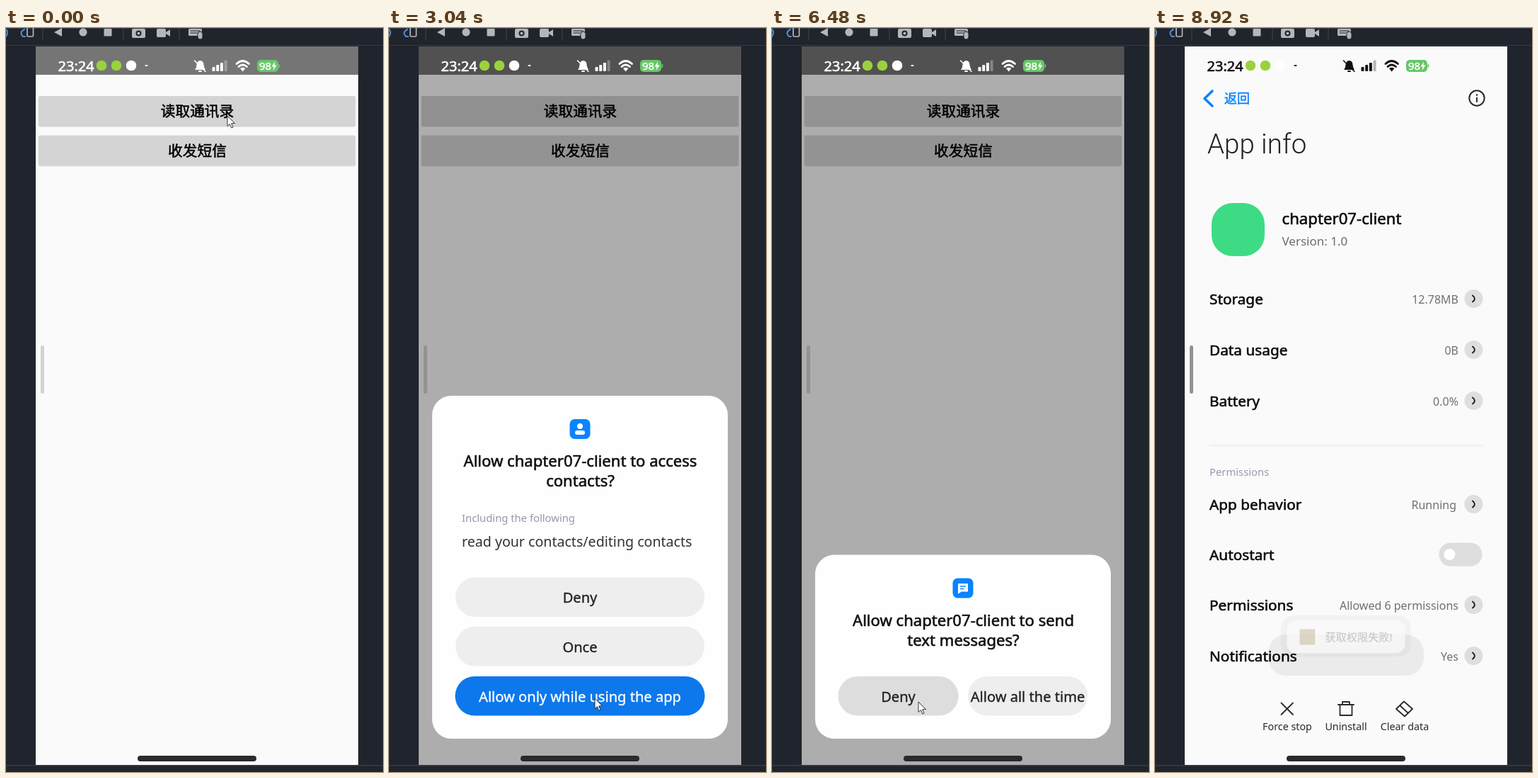
An HTML page that plays this animation: 533x1050 px, repeating every 8.94 s.

```html
<!DOCTYPE html>
<html lang="zh-CN">
<head>
<meta charset="utf-8">
<title>Permission requests</title>
<style>
  html, body { margin: 0; width: 100%; height: 100%; overflow: hidden; background: #20242c; }
  svg { display: block; width: 100%; height: 100%; }
  text { font-family: "Noto Sans", "Noto Sans CJK SC", "Noto Sans CJK", sans-serif; }
  #heading text { font-family: Roboto, Lato, sans-serif; font-weight: 300; }
</style>
</head>
<body>
<svg id="stage" viewBox="0 0 533 1050" preserveAspectRatio="xMinYMin"></svg>
<script>
const LOOP = 8940;
const stage = document.getElementById('stage');

// ---- markup helpers ----
const rect = (x, y, w, h, r, fill, extra = '') =>
  `<rect x="${x}" y="${y}" width="${w}" height="${h}" rx="${r}" fill="${fill}" ${extra}/>`;
const circle = (x, y, r, fill) => `<circle cx="${x}" cy="${y}" r="${r}" fill="${fill}"/>`;
const line = (d, color, width = 2) =>
  `<path d="${d}" fill="none" stroke="${color}" stroke-width="${width}" stroke-linecap="round" stroke-linejoin="round"/>`;
const shape = (d, fill) => `<path d="${d}" fill="${fill}"/>`;
// "thicken" outlines the glyphs to give a medium weight.
const text = (x, y, size, str, { fill = '#111', weight = 400, anchor = 'start', thicken = 0 } = {}) =>
  `<text x="${x}" y="${y}" font-size="${size}" font-weight="${weight}" fill="${fill}" text-anchor="${anchor}"
    stroke="${fill}" stroke-width="${thicken}" stroke-linejoin="round">${str}</text>`;
const middle = (x, y, size, str, options) => text(x, y, size, str, { anchor: 'middle', ...options });
const group = (id, body, extra = '') => `<g id="${id}" ${extra}>${body}</g>`;

// ---- parts ----
function toolbar() {
  const gray = '#b4b6ba', blue = '#4a8fd6';
  return rect(0, 0, 533, 1, 0, '#383b42') + rect(0, 24, 533, 1, 0, '#343b45') + rect(0, 1040, 533, 1.5, 0, '#363d47') +
    [52, 166, 245].map(x => rect(x - .5, 0, 1, 18, 0, '#41454d')).join('') +
    line('M0 2Q4 6 0 12', blue) + line('M26 2Q18 6 24 12H27', blue) +
    `<rect x="30" y="-4" width="8.5" height="16" rx="1.5" fill="none" stroke="${gray}" stroke-width="1.7"/>` +
    shape('M68 6L79 0V12Z', gray) + circle(109, 6, 5.6, gray) + rect(138.5, 1, 11, 10.5, 1, gray) +
    rect(178, 1, 19, 13, 2, gray) + circle(187.5, 7.5, 4, '#20242c') + circle(187.5, 7.5, 2, gray) +
    rect(213, 1, 13, 12, 2, gray) + shape('M226 6L232 2V12L226 8Z', gray) +
    rect(258, 1, 19, 10, 1.5, gray) +
    line('M261 4H274M261 7H270', '#20242c', 1.2) +
    rect(271, 5, 7, 11, 3.5, gray, 'stroke="#20242c"');
}

function statusIcons() {
  const ink = 'currentColor';
  return text(73.5, 61, 20, '23:24', { fill: ink, thicken: .6 }) +
    circle(135, 53, 7.3, '#9bd23c') + circle(156, 53, 7.3, '#9bd23c') + circle(177, 53, 7.3, '#fff') +
    rect(196.5, 52, 4, 2, 1, ink) +
    shape('M267 59Q269.5 56 269.5 52Q270 46.5 274.5 46Q279.5 46.5 279.5 52Q280 56 282 59Z', ink) +
    rect(272, 60, 5, 2, 1, ink) +
    line('M266.5 46L282 61.5', ink, 1.6) +
    [6, 9, 12].map((h, i) => rect(291.5 + i * 5.7, 61 - h, 4, h, 1, ink)).join('') +
    rect(308.6, 45.5, 4, 15.5, 1, ink, 'opacity=".3"') +
    line('M326 50.5Q334.5 42.5 343.5 50.5M329 54.5Q334.5 49.5 340.5 54.5', ink, 2.8) +
    shape('M331 57Q334.7 54.5 338.4 57L334.7 61.5Z', ink) +
    rect(355, 45, 30, 17, 5, '#67c768') + rect(385.5, 51, 1.8, 5, .9, '#67c768') +
    text(358, 59, 15, '98', { fill: '#fff', thicken: .5 }) +
    shape('M380 47.5L375.5 54.5H378.5L377.5 60L382.5 52.5H379.5Z', '#fff');
}

function menu() {
  const button = (id, y, label) =>
    rect(45.5, y + .5, 449, 43.5, 3, '#e6e6e6') + rect(46, y, 448, 43, 2, '#d4d4d4', `id="${id}"`) +
    middle(270.5, y + 29, 20.7, label, { thicken: .5, fill: '#000' });
  return rect(42, 26, 456, 1014, 0, '#fafafa') + rect(42, 26, 456, 40, 0, '#757575') +
    button('contactsButton', 96, '读取通讯录') + button('smsButton', 151.5, '收发短信');
}

function dialog(top, icon, titles, body) {
  return rect(61, top, 418, 1003 - top, 27, '#fefefe') + rect(255.5, top + 33, 29, 28, 7, '#0a84ff') +
    `<g transform="translate(270 ${top + 47})">${icon}</g>` +
    titles.map((str, i) => middle(270.5, top + 100 + i * 28, 22.1, str, { thicken: .6 })).join('') + body;
}

const pill = (x, y, w, label, fill = '#eee', ink = '#222', id = '') =>
  rect(x, y, w, 55.5, 27.7, fill, id && `id="${id}"`) +
  middle(x + w / 2, y + 35.5, 20.1, label, { fill: ink, thicken: .35 });

function contactsDialog() {
  const icon = circle(0, -4, 4, '#fff') + rect(-7, 2, 14, 6, 3, '#fff');
  return dialog(519, icon, ['Allow chapter07-client to access', 'contacts?'],
    text(103, 697, 14.8, 'Including the following', { fill: '#9397ae' }) +
    text(103, 732, 19.6, 'read your contacts/editing contacts', { fill: '#333' }) +
    pill(94, 775.5, 352, 'Deny') + pill(94, 845, 352, 'Once') +
    pill(93.5, 915, 353, 'Allow only while using the app', '#0d84ff', '#fff', 'allowButton'));
}

function smsDialog() {
  const icon = shape('M-7 -6.5H7V5H-2L-7 8Z', '#fff') + line('M-3.5 -2.5H3.5M-3.5 1H1', '#0a84ff', 1.5);
  return dialog(743.5, icon, ['Allow chapter07-client to send', 'text messages?'],
    pill(93.5, 915, 170, 'Deny', '#eee', '#222', 'denyButton') + pill(277, 915, 169, 'Allow all the time'));
}

function appInfo() {
  const ink = '#2a2a2a', label = { thicken: .6, fill: '#0c0c0c' };
  const row = (y, name, value, right = 429) =>
    text(77, y + 7.5, 20.8, name, label) +
    text(right, y + 6.5, 16, value, { fill: '#707070', anchor: 'end' }) +
    circle(450.5, y, 13, '#dedede') + line(`M449 ${y - 4.5}Q455 ${y} 449 ${y + 4.5}`, '#222');
  const action = (x, name) => middle(x, 991, 14.3, name, { fill: ink });
  return rect(42, 26, 456, 1014, 0, '#fafafa', 'id="pageBack"') +
    line('M81 89L70 99.5L81 110', '#0a84ff', 3.6) + text(98, 106, 18, '返回', { fill: '#0a84ff', thicken: .5 }) +
    `<circle cx="455" cy="99" r="10.7" fill="none" stroke="${ink}" stroke-width="2"/>` +
    circle(455, 94.5, 1.3, ink) + line('M455 98.5V104', ink) +
    group('heading', text(74, 177, 38.5, 'App info', { weight: 300, fill: '#222' })) +
    rect(80, 247, 75, 75, 30, '#3ddc84') +
    text(179.5, 277, 22.2, 'chapter07-client', label) + text(179.5, 306.5, 17, 'Version: 1.0', { fill: '#6c6c6c' }) +
    row(382, 'Storage', '12.78MB') + row(454, 'Data usage', '0B') + row(526, 'Battery', '0.0%') +
    rect(77, 588.5, 387, 1, 0, '#e5e5e5') +
    text(77, 631.5, 14.8, 'Permissions', { fill: '#9699b0' }) +
    row(672, 'App behavior', 'Running', 426) +
    text(77, 751, 20.8, 'Autostart', label) + rect(401.5, 726.5, 61, 33, 16.5, '#dedede') + circle(416.5, 743, 8, '#fff') +
    row(814, 'Permissions', 'Allowed 6 permissions') + row(886, 'Notifications', 'Yes') +
    line('M178.5 952.5L195 969M195 952.5L178.5 969', ink, 1.8) + action(187, 'Force stop') +
    line('M259 955H281M265 955V951H275V955M261.5 955V970H278.5V955', ink, 1.8) + action(270, 'Uninstall') +
    line('M341 961L352 950.5L364 961L353 971.5ZM346 956L358 967', ink, 1.8) + action(353, 'Clear data');
}

const toastShadow = rect(160, 856, 220, 58, 25, '#000', 'opacity=".06"') + rect(178, 829, 184, 58, 18, '#000', 'opacity=".03"');
const toastBody = rect(182, 834.5, 176, 49, 14, '#fbfbfb') +
  group('toastContent', rect(201, 848, 23, 23, 1, '#7d5c14') + text(239, 865, 16, '获取权限失败!', { fill: '#222', thicken: .2 }));

stage.innerHTML = '<clipPath id="screen"><rect x="42" y="26" width="456" height="1014"/></clipPath>' +
  toolbar() +
  group('phone',
    menu() + rect(42, 26, 456, 1014, 0, '#000', 'id="dim"') +
    group('contacts', contactsDialog()) + group('sms', smsDialog()) +
    group('wallpaper', rect(42, 26, 456, 1014, 0, '#e3d8c9')) +
    group('page', appInfo()) +
    group('shadow', toastShadow) + group('toast', toastBody) +
    group('status', statusIcons()) +
    rect(49, 448, 5, 68, 2.5, '#929292', 'id="edgeBar"') +
    rect(186, 1027, 168, 8, 4, '#2a2a2c'),
    'clip-path="url(#screen)"') +
  group('cursor', '<path d="M0 0V14.5L3.4 11.5L5.8 17L8 16L5.6 10.6H10.5Z" fill="#fff" stroke="#222" stroke-width=".9"/>');

const ui = Object.fromEntries([...stage.querySelectorAll('[id]')].map(node => [node.id, node]));

// ---- timing ----
// The screen refreshes in runs: start time and number of 120 ms steps.
const refreshes = [[0, 1], [370, 1], [520, 1], [780, 8], [1740, 2], [2010, 3], [2400, 2], [2670, 4], [3190, 1],
  [3470, 1], [3620, 1], [3770, 3], [4150, 3], [4540, 2], [4810, 1], [4950, 5], [5580, 3], [5970, 2], [6240, 4],
  [6750, 1], [6900, 3], [7290, 2], [7550, 6], [8300, 4], [8800, 2]]
  .flatMap(([start, count]) => Array.from({ length: count }, (_, i) => start + i * 120));

// time, x, y
const cursorPath = [[0, 313, 124], [360, 313, 124], [370, 319, 119], [520, 324, 112], [2010, 324, 112],
  [2520, 291, 948], [4010, 291, 943], [4400, 270, 290], [4540, 244, 124], [4670, 287, 190], [4810, 299, 206],
  [5070, 311, 179], [5970, 311, 179], [6360, 207, 951], [7140, 207, 951], [7290, 207, 945], [LOOP, 207, 945]];

const clamp = v => Math.max(0, Math.min(1, v));
const ramp = (t, a, b) => clamp((t - a) / (b - a));
const show = (node, on) => node.setAttribute('visibility', on ? 'visible' : 'hidden');

function cursorAt(t) {
  const i = cursorPath.findIndex((p, n) => n > 0 && t <= p[0]);
  const [t0, x0, y0] = cursorPath[i - 1], [t1, x1, y1] = cursorPath[i];
  const u = ramp(t, t0, t1);
  return [x0 + (x1 - x0) * u, y0 + (y1 - y0) * u];
}

function placeDialog(node, top, t, enter, leave, gone) {
  const shown = (1 - (1 - ramp(t, enter, enter + 350)) ** 3) * (1 - ramp(t, leave, gone) ** 2);
  show(node, shown > 0);
  node.setAttribute('transform', `translate(0 ${(1 - shown) * (1040 - top)})`);
  return shown;
}

function draw(t) {
  const contacts = placeDialog(ui.contacts, 519, t, 1660, 3540, 4010);
  const sms = placeDialog(ui.sms, 743.5, t, 5500, 6820, 7140);
  ui.dim.setAttribute('opacity', .31 * Math.max(contacts, sms));

  ui.contactsButton.setAttribute('fill', t >= 1500 && t < 4010 ? '#d0d0d0' : '#d4d4d4');
  ui.allowButton.setAttribute('fill', t >= 2520 ? '#0d78ec' : '#0d84ff');
  ui.denyButton.setAttribute('fill', t >= 6360 ? '#ddd' : '#eee');
  ui.edgeBar.setAttribute('fill', t >= 780 ? '#929292' : '#d2d2d2');

  // The settings page settles with an exponential slide and zoom.
  const paged = t >= 7140;
  const rest = t >= 7550 ? 0 : Math.exp((7290 - t) / 60);
  const zoom = 1 - .0095 * rest;
  for (const node of [ui.wallpaper, ui.page, ui.shadow, ui.toast]) show(node, paged);
  ui.page.setAttribute('transform', `translate(${270 + 5.5 * rest} 530) scale(${zoom}) translate(-270 -530)`);
  ui.pageBack.setAttribute('rx', rest ? 40 : 0);
  ui.status.setAttribute('color', paged ? '#111' : '#fff');

  const fade = ramp(t, 8700, 9000);
  ui.toastContent.setAttribute('opacity', 1 - fade);
  ui.toast.setAttribute('opacity', 1 - .3 * fade);
  ui.toast.setAttribute('transform', `translate(270 859) scale(${1 - .07 * fade}) translate(-270 -859)`);

  const [x, y] = cursorAt(t);
  ui.cursor.setAttribute('transform', `translate(${x} ${y})`);
  show(ui.cursor, t < 7790);
}

function tick() {
  const now = performance.now() % LOOP;
  draw(refreshes.findLast(start => start <= now));
  requestAnimationFrame(tick);
}
tick();
</script>
</body>
</html>
```
